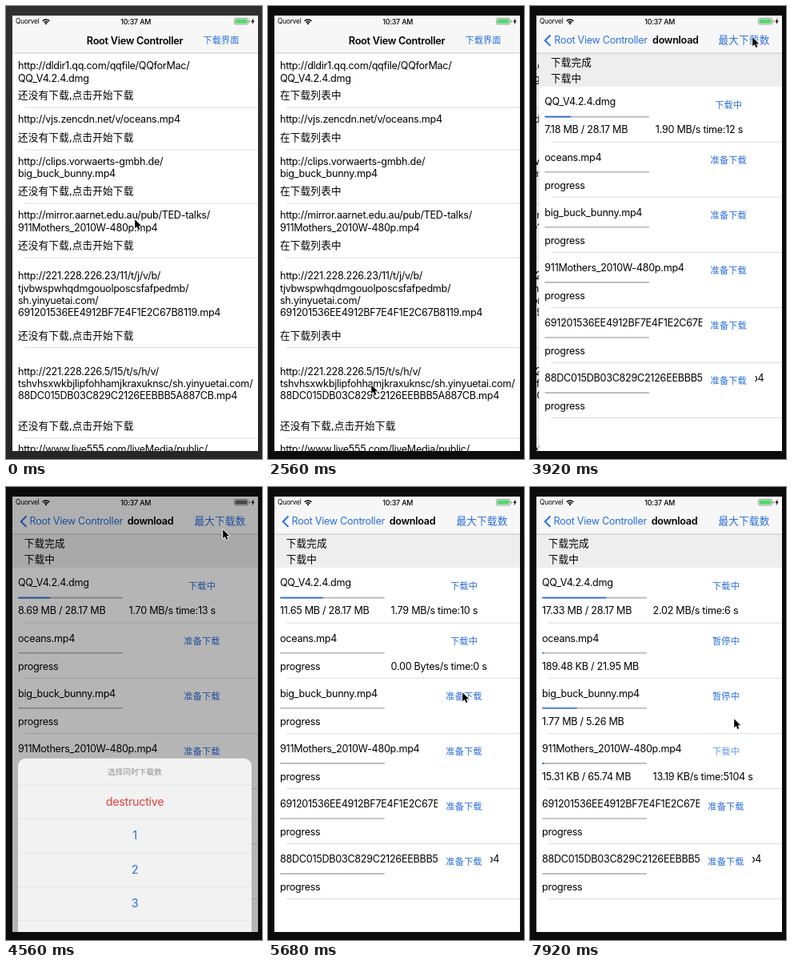
An HTML page with a canvas for the animation above (8000 ms loop, 320 by 567 pixels).

```html
<!DOCTYPE html>
<html lang="zh">
<head>
<meta charset="utf-8">
<style>
html, body { margin: 0; width: 100%; height: 100%; overflow: hidden; background: #0c0c0c; }
canvas { display: block; width: 320px; height: 567px; }
</style>
</head>
<body>
<canvas id="stage"></canvas>
<script>
const W = 320, H = 567, LOOP = 8000, STEP = 80;
const SX = 8, SY = 12, SW = 307, SH = 545, LEFT = 15;
const BLUE = '#2b6fdc', BLACK = '#000', LINE = '#d4d4d6';
const canvas = document.getElementById('stage');
const ctx = canvas.getContext('2d');
const dpr = window.devicePixelRatio || 1;
canvas.width = W * dpr;
canvas.height = H * dpr;

// Root list: text lines with their centres, status centre, separator, time added
const links = [
  { lines: ['http://dldir1.qq.com/qqfile/QQforMac/', 'QQ_V4.2.4.dmg'], y: 75, status: 112, end: 127, added: 400 },
  { lines: ['http://vjs.zencdn.net/v/oceans.mp4'], y: 142, status: 164.5, end: 180, added: 800 },
  { lines: ['http://clips.vorwaerts-gmbh.de/', 'big_buck_bunny.mp4'], y: 194.5, status: 232, end: 247, added: 1200 },
  { lines: ['http://mirror.aarnet.edu.au/pub/TED-talks/', '911Mothers_2010W-480p.mp4'], y: 262, status: 300, end: 315, added: 1600 },
  { lines: ['http://221.228.226.23/11/t/j/v/b/', 'tjvbwspwhqdmgouolposcsfafpedmb/', 'sh.yinyuetai.com/', '691201536EE4912BF7E4F1E2C67B8119.mp4'], y: 338, status: 412.5, end: 427.5, added: 2080 },
  { lines: ['http://221.228.226.5/15/t/s/h/v/', 'tshvhsxwkbjlipfohhamjkraxuknsc/sh.yinyuetai.com/', '88DC015DB03C829C2126EEBBB5A887CB.mp4'], y: 457.5, status: 525.5, end: 541, added: 2800 },
  { lines: ['http://www.live555.com/liveMedia/public/'], y: 555, status: 600, end: 620, added: 9999 }
];
const files = links.slice(0, 6).map(l => l.lines.join('').split('/').pop());

const PUSH = 3560, SHEET = 4420, PICK = 5280, OCEANS_OFF = 6160, BUNNY_OFF = 7600;
const clicks = [320, 720, 1120, 1520, 2000, 2720, 3440, 4320, 5160, 6080, 7520];
const pointer = [
  [0, 162, 268], [240, 163, 105], [400, 163, 105], [640, 162, 155], [800, 162, 155],
  [1040, 161, 210], [1200, 161, 210], [1440, 155, 280], [1600, 155, 280], [1920, 145, 370],
  [2080, 145, 370], [2480, 130, 475], [2800, 130, 475], [3300, 270, 44], [3520, 270, 44],
  [3920, 279, 40], [4320, 279, 42], [4560, 272, 54], [5040, 167, 396], [5240, 167, 396],
  [5680, 244, 258], [5920, 246, 193], [6200, 246, 193], [6900, 246, 262], [7600, 246, 262], [7920, 256, 291]
];
const mainBytes = [[3520, 6.3], [3920, 7.18], [4560, 8.69], [5680, 11.65], [7920, 17.33]];
const mainSpeed = [[0, '1.90', 12], [4320, '1.70', 13], [5040, '1.75', 11], [5520, '1.79', 10],
  [6240, '1.86', 9], [6880, '1.93', 8], [7360, '1.98', 7], [7760, '2.02', 6]];

const clamp = v => Math.max(0, Math.min(1, v));
const ease = u => u * u * (3 - 2 * u);
// Critically damped spring from 0 to 1
function spring(ms) {
  if (ms <= 0) return 0;
  const x = ms * 0.01826;
  return 1 - (1 + x) * Math.exp(-x);
}
function track(keys, t, curve = u => u) {
  let i = 0;
  while (i < keys.length - 2 && keys[i + 1][0] <= t) i++;
  const a = keys[i], b = keys[i + 1];
  const u = curve(clamp((t - a[0]) / (b[0] - a[0])));
  return a.slice(1).map((v, k) => v + (b[k + 1] - v) * u);
}

function rect(x, y, w, h, color) {
  ctx.fillStyle = color;
  ctx.fillRect(x, y, w, h);
}
function panel(x, y, w, h, r, color) {
  ctx.fillStyle = color;
  ctx.beginPath();
  ctx.roundRect(x, y, w, h, r);
  ctx.fill();
}
function text(str, x, y, { size = 12.6, color = BLACK, weight = 400, align = 'left' } = {}) {
  const han = /[\u4e00-\u9fff]/.test(str);
  ctx.font = `${weight} ${size}px Inter, "Noto Sans CJK SC", "Noto Sans CJK", sans-serif`;
  ctx.letterSpacing = (han ? 0.015 : -0.022) * size + 'px';
  ctx.textAlign = align;
  ctx.fillStyle = color;
  ctx.fillText(str, x, y + size * 0.355);
}
function faded(alpha, draw) {
  ctx.save();
  ctx.globalAlpha *= clamp(alpha);
  draw();
  ctx.restore();
}

function drawStatusBar(dimmed) {
  text('Quorvel', 12, 19.5, { size: 8.3 });
  ctx.strokeStyle = BLACK;
  ctx.lineWidth = 1.4;
  for (const r of [3.4, 6]) {
    ctx.beginPath();
    ctx.arc(50, 23, r, -Math.PI * 0.76, -Math.PI * 0.24);
    ctx.stroke();
  }
  ctx.fillStyle = BLACK;
  ctx.beginPath();
  ctx.moveTo(50, 23.4);
  ctx.arc(50, 23.2, 2, -Math.PI * 0.76, -Math.PI * 0.24);
  ctx.fill();
  text('10:37 AM', 162.2, 19.5, { size: 8.9, weight: 500, align: 'center' });
  ctx.strokeStyle = '#8a8a8a';
  ctx.lineWidth = 0.8;
  ctx.beginPath();
  ctx.roundRect(285.4, 15.4, 17.4, 7.6, 2);
  ctx.stroke();
  panel(286.6, 16.6, 15, 5.2, 1, dimmed ? '#666' : '#53d769');
  rect(303.8, 17.8, 1, 2.8, '#8a8a8a');
  ctx.fillStyle = BLACK;
  ctx.beginPath();
  [[309.6, 15], [306.4, 19.9], [308.4, 19.9], [307.4, 23.6], [310.8, 18.5], [308.8, 18.5]]
    .forEach(p => ctx.lineTo(...p));
  ctx.fill();
}

function drawNav(p, dimmed) {
  rect(SX, SY, SW, 47, '#f7f7f7');
  rect(SX, 58.6, SW, 0.8, '#b9b9bb');
  drawStatusBar(dimmed);
  if (p < 1) {
    faded(1 - p * 1.6, () => {
      text('Root View Controller', 161 - 73 * p, 43, { size: 12.7, weight: 600, align: 'center' });
      text('下载界面', 246.4, 43, { size: 11.1, color: BLUE });
    });
  }
  if (p > 0) {
    faded(p, () => {
      const shift = 1 - p;
      ctx.strokeStyle = BLUE;
      ctx.lineWidth = 2;
      ctx.beginPath();
      ctx.moveTo(25.5, 36.5);
      ctx.lineTo(18.8, 43.2);
      ctx.lineTo(25.5, 49.9);
      ctx.stroke();
      text('Root View Controller', 29.5 + 70 * shift, 43, { color: BLUE });
      text('download', 180.5 + 130 * shift, 43, { weight: 600, align: 'center' });
      text('最大下载数', 235.5, 43, { color: BLUE });
    });
  }
}

function drawRoot(t) {
  rect(SX, SY, SW, SH, '#fff');
  for (const l of links) {
    l.lines.forEach((s, i) => text(s, LEFT, l.y + i * 15.1));
    text(t >= l.added ? '在下载列表中' : '还没有下载,点击开始下载', LEFT, l.status);
    rect(23, l.end - 0.4, SW + SX - 23, 0.8, LINE);
  }
}

const IDLE = { button: '准备下载', label: 'progress', done: 0 };
const STARTING = { button: '下载中', label: 'progress', done: 0, speed: '0.00 Bytes/s time:0 s' };

function taskState(i, t) {
  if (i === 0) {
    const mb = track(mainBytes, t)[0];
    const [, rate, left] = mainSpeed.filter(s => s[0] <= t).pop();
    return { button: '下载中', label: mb.toFixed(2) + ' MB / 28.17 MB', done: mb / 28.17,
      speed: `${rate} MB/s time:${left} s` };
  }
  if (i === 1 && t >= 5360) {
    if (t < 5760) return STARTING;
    const kb = 189.48 * clamp((t - 5680) / 400);
    const s = { button: '暂停中', label: kb.toFixed(2) + ' KB / 21.95 MB', done: kb / 1024 / 21.95 };
    if (t < OCEANS_OFF) Object.assign(s, { button: '下载中', speed: '96.40 KB/s time:231 s' });
    return s;
  }
  if (i === 2 && t >= OCEANS_OFF) {
    if (t < 6400) return STARTING;
    const mb = 0.15 + 1.62 * clamp((t - 6400) / 1200);
    const s = { button: '暂停中', label: mb.toFixed(2) + ' MB / 5.26 MB', done: mb / 5.26 };
    if (t < BUNNY_OFF) {
      Object.assign(s, { button: '下载中', speed: `1.02 MB/s time:${Math.ceil((5.26 - mb) / 1.02)} s` });
    }
    return s;
  }
  if (i === 3 && t >= BUNNY_OFF) {
    if (t < 7840) return STARTING;
    return { button: '下载中', label: '15.31 KB / 65.74 MB', done: 0.0002,
      speed: '13.19 KB/s time:5104 s', fade: 0.7 };
  }
  return IDLE;
}

function drawTask(i, t) {
  const y = 101 + i * 69.1, s = taskState(i, t);
  text(files[i], LEFT, y + 19);
  rect(212, y + 8, 66, 32, '#fff');
  faded(s.fade || 1, () =>
    text(s.button, 245, y + 23, { size: 11.2, color: BLUE, align: 'center' }));
  panel(15, y + 36.8, 131, 1.6, 0.8, '#b4b4b4');
  if (s.done > 0) panel(15, y + 36.8, Math.max(3, 131 * s.done), 1.6, 0.8, BLUE);
  text(s.label, LEFT, y + 54);
  if (s.speed) text(s.speed, 153.6, y + 54);
  rect(23, y + 68.7, SW + SX - 23, 0.8, LINE);
}

function drawDownloads(t) {
  rect(SX, SY, SW, SH, '#fff');
  rect(SX, 59, SW, 42, '#eeeeee');
  text('下载完成', 22.7, 70.5, { weight: 500 });
  text('下载中', 22.7, 91, { weight: 500 });
  files.forEach((_, i) => drawTask(i, t));
}

function drawSheet(p) {
  rect(SX, SY, SW, SH, `rgba(0,0,0,${0.4 * p})`);
  const row = 42.4, top = 557 - 300 * p;
  const options = ['destructive', '1', '2', '3', '4'];
  const height = 33 + options.length * row;
  panel(15, top, 292, height, 9.6, '#f2f2f2');
  text('选择同时下载数', 161, top + 16.5, { size: 9.6, color: '#8f8f8f', align: 'center' });
  options.forEach((s, i) => {
    const y = top + 33 + i * row;
    rect(15, y, 292, 0.7, '#dedee0');
    text(s, 161, y + row / 2, { size: 14.4, color: i ? BLUE : '#e0433a', align: 'center' });
  });
  const y = top + height + 5.9;
  panel(15, y, 292, row, 9.6, '#fff');
  text('cancel', 161, y + row / 2, { size: 14.4, color: BLUE, weight: 600, align: 'center' });
}

function drawPointer(t) {
  const [x, y] = track(pointer, t, ease);
  if (clicks.some(c => t >= c - 80 && t <= c + 40)) {
    ctx.strokeStyle = BLACK;
    ctx.lineWidth = 1.5;
    ctx.beginPath();
    ctx.arc(x, y, 18, 0, Math.PI * 2);
    ctx.stroke();
  }
  ctx.beginPath();
  [[0, 0], [0, 11], [2.5, 8.8], [4.3, 12.8], [6.2, 12], [4.5, 8.1], [8, 8]]
    .forEach(([dx, dy]) => ctx.lineTo(x + dx - 0.8, y + dy - 0.8));
  ctx.closePath();
  ctx.lineJoin = 'round';
  ctx.strokeStyle = '#fff';
  ctx.lineWidth = 1.6;
  ctx.stroke();
  ctx.fillStyle = BLACK;
  ctx.fill();
}

function drawBackdrop(t) {
  if (t >= STEP) return rect(0, 0, W, H, '#0c0c0c');
  const g = ctx.createLinearGradient(0, 0, 0, H);
  g.addColorStop(0, '#303030');
  g.addColorStop(1, '#262626');
  rect(0, 0, W, H, g);
}

function draw(t) {
  ctx.setTransform(dpr, 0, 0, dpr, 0, 0);
  drawBackdrop(t);
  ctx.save();
  ctx.beginPath();
  ctx.rect(SX, SY, SW, SH);
  ctx.clip();
  const raw = spring(t - PUSH), push = raw > 0.998 ? 1 : raw;
  if (push < 1) {
    ctx.save();
    ctx.translate(-0.3 * SW * push, 0);
    drawRoot(t);
    ctx.restore();
  }
  if (push > 0) {
    rect(SX, SY, SW, SH, `rgba(0,0,0,${0.1 * push})`);
    ctx.save();
    ctx.translate(SW * (1 - push), 0);
    drawDownloads(t);
    ctx.restore();
  }
  const sheet = t < PICK ? spring(t - SHEET) : 1 - spring(t - PICK);
  const open = sheet > 0.01;
  drawNav(push, open);
  if (open) drawSheet(sheet);
  drawPointer(t);
  ctx.restore();
}

const start = performance.now();
function frame() {
  const t = (performance.now() - start) % LOOP;
  draw(Math.floor(t / STEP) * STEP);
  requestAnimationFrame(frame);
}
frame();
</script>
</body>
</html>
```
